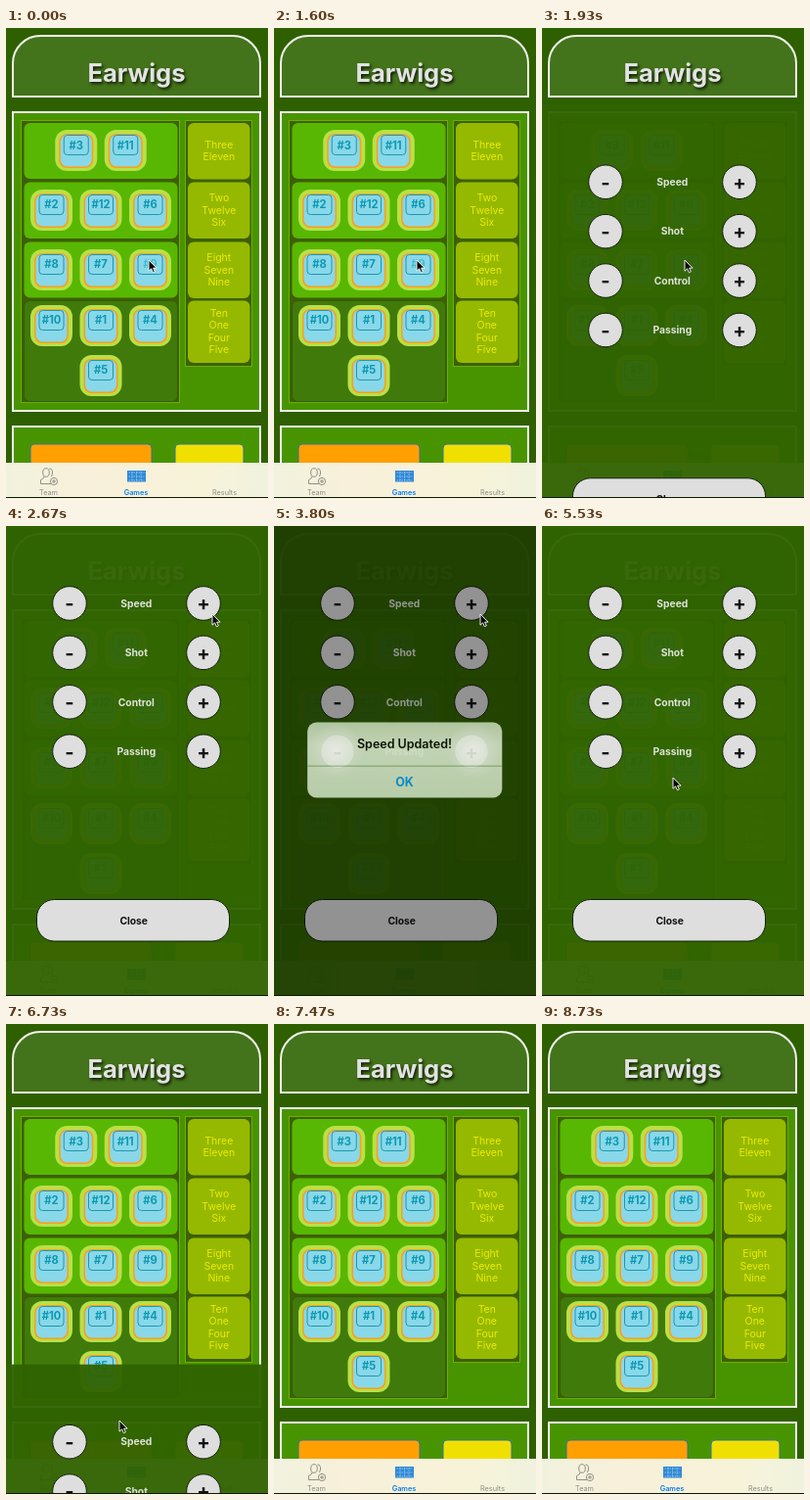
These frames come from a looping animation (268x480 px, 8.79 s). An HTML page:

```html
<!DOCTYPE html>
<html lang="en">
<head>
<meta charset="utf-8">
<title>Team planner</title>
<style>
html, body { margin: 0; width: 100%; height: 100%; overflow: hidden; background: #2f6000; }
svg { display: block; width: 100vw; height: 100vh; font-family: Inter, Roboto, sans-serif; text-anchor: middle; }
.title { font-size: 25.6px; font-weight: 700; fill: #e2e2e2; text-shadow: 1.5px 2px 3px rgba(0, 0, 0, .75); }
.side { font-size: 10.5px; fill: #ecea08; }
.num { font-size: 11.2px; font-weight: 700; fill: #0d98b2; }
.tab { font-size: 7.3px; fill: #8d8d87; }
.label { font-size: 10.3px; font-weight: 700; fill: #dfe3d8; }
.sign { font-size: 20px; font-weight: 700; fill: #111; }
.btn { fill: #dedede; stroke: #14200a; stroke-width: 1; }
.card { fill: #489400; stroke: #f0f4ec; stroke-width: 2; }
.frame { fill: #3d6004; stroke: #6cb000; stroke-width: 1; }
</style>
</head>
<body>
<svg viewBox="0 0 268 480" preserveAspectRatio="none">
  <defs>
    <linearGradient id="glass" x1="0" y1="0" x2="0" y2="1">
      <stop offset="0" stop-color="#c6d9b8"/>
      <stop offset=".3" stop-color="#dae9cf"/>
      <stop offset="1" stop-color="#cfe2c3"/>
    </linearGradient>
    <radialGradient id="glow">
      <stop offset="0" stop-color="#f3f6ee"/>
      <stop offset="1" stop-color="#f3f6ee" stop-opacity="0"/>
    </radialGradient>
    <linearGradient id="bar">
      <stop offset="0" stop-color="#f1f2de"/>
      <stop offset=".3" stop-color="#f8f0da"/>
      <stop offset=".75" stop-color="#f7f3d9"/>
      <stop offset="1" stop-color="#f0f2de"/>
    </linearGradient>
  </defs>
  <g id="home"></g>
  <g id="modal"></g>
  <rect id="dim" width="268" height="480"/>
  <g id="alert"></g>
  <rect y="479" width="268" height="1" fill="#0c1a00"/>
  <path id="cursor" d="M0 0V11.2L2.6 8.8L4.4 12.7L6.3 11.9L4.6 8.1H8.1Z" fill="#080808" stroke="#fff" stroke-width=".9"/>
</svg>
<script>
const LOOP = 8790;
const $ = id => document.getElementById(id);
const rect = (x, y, w, h, r, attrs) =>
  `<rect x="${x}" y="${y}" width="${w}" height="${h}" rx="${r}" ${attrs}/>`;
const text = (x, y, cls, s, attrs = '') =>
  `<text x="${x}" y="${y}" class="${cls}" ${attrs}>${s}</text>`;

function tile(n, x, y, ty) {
  return rect(x - 21.5, y - 21, 43, 42, 12, 'fill="#b9e048"') +
    rect(x - 17.5, y - 17, 35, 35, 8, 'fill="#ff9d18"') +
    rect(x - 16, y - 16, 32, 32.5, 7, 'fill="#88d8e9"') +
    rect(x - 12.5, y - 15.5, 25, 20, 3.5, 'fill="none" stroke="#2196ae"') +
    text(x, ty + 4, 'num', '#' + n, `id="n${n}"`);
}

function home() {
  const rows = [
    [97, 57, 125, 120, [3, 11]],
    [157.5, 57.5, 186, 180, [2, 12, 6]],
    [218.5, 57, 247, 241, [8, 7, 9]],
    [278.5, 103, 304, 298, [10, 1, 4]]
  ];
  const names = [['Three', 'Eleven'], ['Two', 'Twelve', 'Six'],
    ['Eight', 'Seven', 'Nine'], ['Ten', 'One', 'Four', 'Five']];
  let s = rect(0, 0, 268, 480, 0, 'fill="#2f6000"');
  s += '<path class="card" style="fill:#43731a" d="M7 70V36A28 28 0 0 1 35 8H232A28 28 0 0 1 260 36V70Z"/>';
  s += text(133.5, 54.5, 'title', 'Earwigs');
  s += rect(7, 86, 253, 305, 0, 'class="card"');
  s += rect(15.5, 94.5, 162, 288, 0, 'class="frame"');
  s += rect(183.5, 94.5, 68, 251, 0, 'class="frame"');
  rows.forEach(([y, h, cy, ty, nums], i) => {
    s += rect(18.5, y, 157, h, 6, i < 3 ? 'fill="#58b702"' : 'fill="#407a0a" stroke="#345c04"');
    nums.forEach((n, k) => {
      s += tile(n, 97 + (k - (nums.length - 1) / 2) * 50.5, cy, ty);
    });
    const sh = i < 3 ? 57.5 : 63.5;
    s += rect(186, y, 63.5, sh, 6, 'fill="#95b900"');
    names[i].forEach((name, k) => {
      s += text(217.8, y + sh / 2 + 3.3 + (k - (names[i].length - 1) / 2) * 12.2, 'side', name);
    });
  });
  s += tile(5, 97, 355, 349);
  s += rect(7, 407, 253, 90, 0, 'class="card"');
  s += rect(25, 425, 124, 50, 4, 'fill="#ffa000" stroke="#34749a"');
  s += rect(173, 425, 70, 50, 4, 'fill="#f0e000" stroke="#34749a"');
  return s + tabs();
}

function tabs() {
  let s = rect(0, 444, 268, 36, 0, 'fill="url(#bar)"');
  s += `<g fill="none" stroke="#85857f" stroke-width=".9">
    <ellipse cx="41" cy="454" rx="3.3" ry="4.3"/>
    <path d="M39 458Q39 460 35.5 461.5V465.5H46M44.5 450Q48 450 47.5 455L46.5 458"/>
    <circle cx="49" cy="463" r="3.6"/><path d="M47 463H51M49 461V465"/></g>`;
  s += rect(124, 452, 19, 11.5, 0, 'fill="#2e88d8"');
  s += `<path d="M125.5 454H141.5M125.5 458H141.5M125.5 462H141.5M129 453V463M133.5 453V463M138 453V463"
    stroke="#b9d8ea" stroke-width=".7" stroke-dasharray="1.5 1"/>`;
  s += text(43.5, 477, 'tab', 'Team') + text(223.5, 477, 'tab', 'Results');
  return s + text(133, 477, 'tab', 'Games', 'style="fill:#087cf0;font-weight:600"');
}

function modal() {
  let s = rect(0, 0, 268, 480, 0, 'fill="#306200" opacity=".95"');
  ['Speed', 'Shot', 'Control', 'Passing'].forEach((name, i) => {
    const y = 79 + i * 50.4;
    for (const [x, sign] of [[65, '-'], [202, '+']])
      s += `<circle class="btn" cx="${x}" cy="${y}" r="17.3"/>` + text(x, y + 7.3, 'sign', sign);
    s += text(133.3, y + 3.7, 'label', name);
  });
  s += rect(31.5, 381.5, 197, 42.5, 18, 'class="btn"');
  return s + text(130.7, 406.7, 'label', 'Close', 'style="fill:#111"');
}

function alertBox() {
  let s = rect(36.5, 201.5, 194.5, 75, 9, 'fill="url(#glass)"');
  for (const x of [65, 202]) s += `<circle cx="${x}" cy="230" r="27" fill="url(#glow)"/>`;
  s += '<path d="M36.5 245H231" stroke="#6f9e58" stroke-width=".8"/>';
  s += text(133.5, 227.5, '', 'Speed Updated!', 'font-size="12.2" font-weight="600" fill="#0a0f06"');
  return s + text(133.5, 265.7, '', 'OK', 'font-size="12.2" font-weight="700" fill="#0795e6"');
}

// Cubic bezier (.25,.1,.25,1), solved for x by bisection
function ease(x) {
  const bez = (u, a, b) => 3 * u * (1 - u) ** 2 * a + 3 * u * u * (1 - u) * b + u ** 3;
  let lo = 0, hi = 1;
  for (let i = 0; i < 18; i++) {
    const mid = (lo + hi) / 2;
    if (bez(mid, .25, .25) < x) lo = mid; else hi = mid;
  }
  return bez(lo, .1, 1);
}
const ramp = (t, start, dur) => {
  const p = Math.min(1, Math.max(0, (t - start) / dur));
  return p === 0 || p === 1 ? p : ease(p);
};

// time, x, y of the pointer tip
const track = [[0, 146, 237], [2050, 146, 237], [2600, 211, 90], [4050, 211, 90], [4700, 134, 257],
  [5650, 134, 257], [6250, 116, 405], [6950, 116, 405], [7500, 104, 492], [LOOP, 104, 492]];
function pointer(t) {
  const i = track.findIndex(k => k[0] > t);
  const [t0, x0, y0] = track[i - 1], [t1, x1, y1] = track[i];
  const u = (t - t0) / (t1 - t0), p = u * u * (3 - 2 * u);
  return [x0 + (x1 - x0) * p, y0 + (y1 - y0) * p];
}

function draw(t) {
  const open = ramp(t, 1700, 430) - ramp(t, 6550, 420);
  $('modal').setAttribute('transform', `translate(0 ${480 * (1 - open)})`);
  $('modal').setAttribute('visibility', open > 0 ? 'visible' : 'hidden');
  const rise = ramp(t, 3600, 350), shown = rise - ramp(t, 5020, 300);
  $('dim').setAttribute('opacity', .4 * shown);
  $('alert').setAttribute('opacity', shown);
  const k = 1.18 - .18 * rise;
  $('alert').setAttribute('transform', `translate(133.7 239) scale(${k}) translate(-133.7 -239)`);
  $('n9').setAttribute('opacity', t < 2200 ? .5 : 1);
  $('cursor').setAttribute('transform', `translate(${pointer(t)})`);
}

$('home').innerHTML = home();
$('modal').innerHTML = modal();
$('alert').innerHTML = alertBox();
const start = performance.now();
function tick() {
  draw((performance.now() - start) % LOOP);
  requestAnimationFrame(tick);
}
tick();
</script>
</body>
</html>
```
